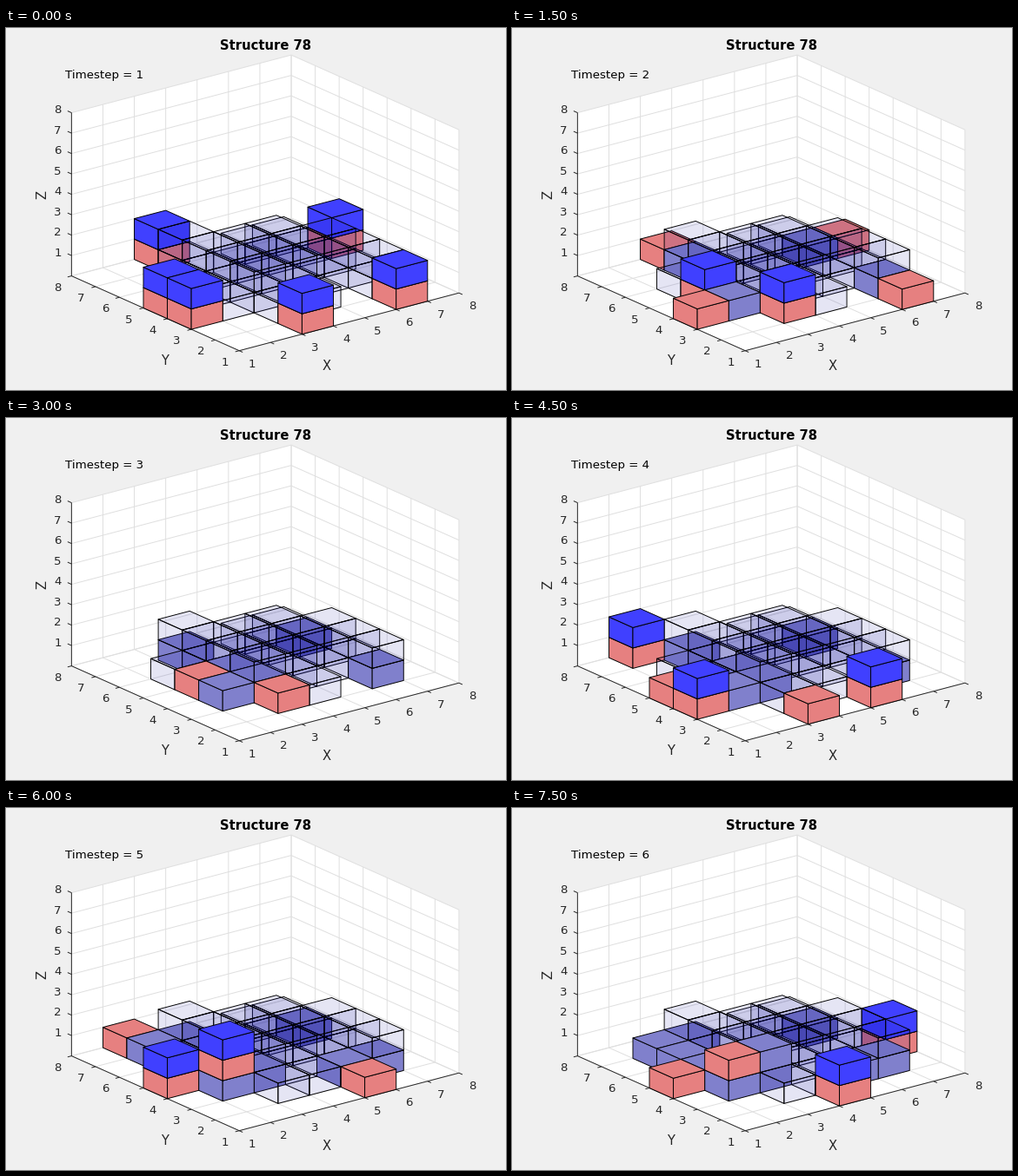
A matplotlib script for the animation above (8 s loop, 575 by 417 pixels).

```python
import numpy as np
import matplotlib.pyplot as plt
from matplotlib.animation import FuncAnimation
from matplotlib.collections import LineCollection, PolyCollection

W, H, DPI = 575, 417, 100
STEP = 500                      # ms per animation frame
ORIGIN = np.array([267.7, 371.2])
EX = np.array([36.1, -9.5])
EY = np.array([-27.55, -12.3])
EZ = np.array([0.0, -23.5])

INK = (0.15, 0.15, 0.15)
GRID = (0.873, 0.873, 0.873)
BLUE = (0.25, 0.25, 1.0, 1.0)
RED = (0.9, 0.5, 0.5, 1.0)
PLACED = (0.5, 0.5, 0.8, 1.0)
GHOST = (0.0, 0.0, 0.6, 0.1)


def project(a, b, z):
    return ORIGIN + a * EX + b * EY + z * EZ


# Cells of the planned structure
plan = {(a, b, 0) for a in range(1, 6) for b in range(1, 6)}
plan -= {(1, 1, 0), (1, 5, 0), (4, 1, 0), (3, 5, 0)}
plan |= {(a, b, 1) for a in range(2, 5) for b in range(2, 5)}
plan |= {(2, 5, 1), (5, 1, 1), (5, 2, 1), (5, 3, 1)}

# Time step at which each cell has been filled
filled = {
    (1, 2, 0): 1, (2, 5, 0): 1, (5, 1, 0): 1, (5, 4, 0): 1,
    (2, 3, 0): 2, (2, 2, 0): 2,
    (1, 5, 0): 4, (4, 1, 0): 4,
    (2, 2, 1): 5, (1, 3, 0): 5, (1, 4, 0): 5,
}

# Carriers with a block on top, and empty carriers, per time step
loaded = [
    [(0, 2, 0), (0, 3, 0), (2, 0, 0), (5, 0, 0), (2, 6, 0), (6, 4, 0)],
    [(1, 3, 0), (2, 1, 0)],
    [],
    [(0, 2, 0), (4, 0, 0), (1, 6, 0)],
    [(0, 3, 0), (1, 2, 1)],
    [(3, 0, 0), (6, 2, 0)],
]
empty = [
    [],
    [(0, 2, 0), (5, 0, 0), (2, 6, 0), (6, 4, 0)],
    [(1, 3, 0), (2, 1, 0)],
    [(0, 3, 0), (2, 0, 0)],
    [(4, 0, 0), (1, 6, 0)],
    [(0, 3, 0), (1, 2, 1)],
]


def cube_faces(a, b, z):
    left = [(a, b, z), (a, b + 1, z), (a, b + 1, z + 1), (a, b, z + 1)]
    right = [(a, b, z), (a + 1, b, z), (a + 1, b, z + 1), (a, b, z + 1)]
    top = [(a, b, z + 1), (a + 1, b, z + 1),
           (a + 1, b + 1, z + 1), (a, b + 1, z + 1)]
    return [[project(*p) for p in face] for face in (left, right, top)]


def scene(step):
    cells = {c: GHOST for c in plan}
    cells.update({c: PLACED for c, t in filled.items() if t <= step})
    for c in empty[step]:
        cells[c] = RED
    for a, b, z in loaded[step]:
        cells[a, b, z] = RED
        cells[a, b, z + 1] = BLUE
    verts, colors = [], []
    # Far cells first
    for c in sorted(cells, key=lambda c: (-c[0], -c[1], c[2])):
        verts += cube_faces(*c)
        colors += [cells[c]] * 3
    return verts, colors


fig = plt.figure(figsize=(W / DPI, H / DPI), dpi=DPI, facecolor="#f0f0f0")
ax = fig.add_axes([0, 0, 1, 1])
ax.set_xlim(-0.5, W - 0.5)
ax.set_ylim(H - 0.5, -0.5)
ax.axis("off")
plt.rcParams["font.family"] = "DejaVu Sans"


def label(x, y, text, size=9.6, color=INK, **kw):
    kw = {"ha": "center", "va": "center_baseline", **kw}
    return ax.text(x, y, text, fontsize=size, color=color, **kw)


def lines(segments, color, width, z):
    ax.add_collection(LineCollection(segments, colors=[color],
                                     linewidths=width, zorder=z))


# Floor and back walls
walls = [
    [(0, 0, 0), (7, 0, 0), (7, 7, 0), (0, 7, 0)],
    [(0, 7, 0), (7, 7, 0), (7, 7, 8), (0, 7, 8)],
    [(7, 0, 0), (7, 7, 0), (7, 7, 8), (7, 0, 8)],
]
ax.add_collection(PolyCollection([[project(*p) for p in w] for w in walls],
                                 facecolors="white", edgecolors="none",
                                 zorder=0))

grid = []
for i in range(8):
    for path in ([(i, 0, 0), (i, 7, 0), (i, 7, 8)],
                 [(0, i, 0), (7, i, 0), (7, i, 8)]):
        grid.append([project(*p) for p in path])
for k in range(9):
    grid.append([project(*p) for p in ((0, 7, k), (7, 7, k), (7, 0, k))])
lines(grid, GRID, 0.7, 1)

# Axis lines, ticks and tick labels
axes = [[project(*p) for p in ((0, 7, 8), (0, 7, 0), (0, 0, 0), (7, 0, 0))]]
ticks = []
for i in range(8):
    px, py, pz = project(i, 0, 0), project(0, i, 0), project(0, 7, i + 1)
    ticks += [[px, px + (4, 1.8)], [py, py + (-4.5, 1.2)],
              [pz, pz + (-4.5, -2)]]
    label(px[0] + 15, px[1] + 14, i + 1)
    label(py[0] - 16.5, py[1] + 12, i + 1)
    label(pz[0] - 16, pz[1] - 4.5, i + 1)
lines(axes + ticks, INK, 0.7, 2)

label(368, 387, "X", 10.6)
label(182, 382, "Y", 10.6)
label(41, 191, "Z", 10.6, rotation=90, va="center")
label(297.5, 18.5, "Structure 78", 10.65, "black", weight="bold")
clock = label(68, 52.5, "", 9.6, "black", ha="left")

cubes = PolyCollection([], edgecolors="black", linewidths=0.68, zorder=3)
ax.add_collection(cubes)


def update(frame):
    step = frame // 3
    verts, colors = scene(step)
    cubes.set_verts(verts)
    cubes.set_facecolor(colors)
    clock.set_text(f"Timestep = {step + 1}")
    return cubes, clock


anim = FuncAnimation(fig, update, frames=16, interval=STEP, repeat=True,
                     repeat_delay=0, blit=False)
plt.show()
```
